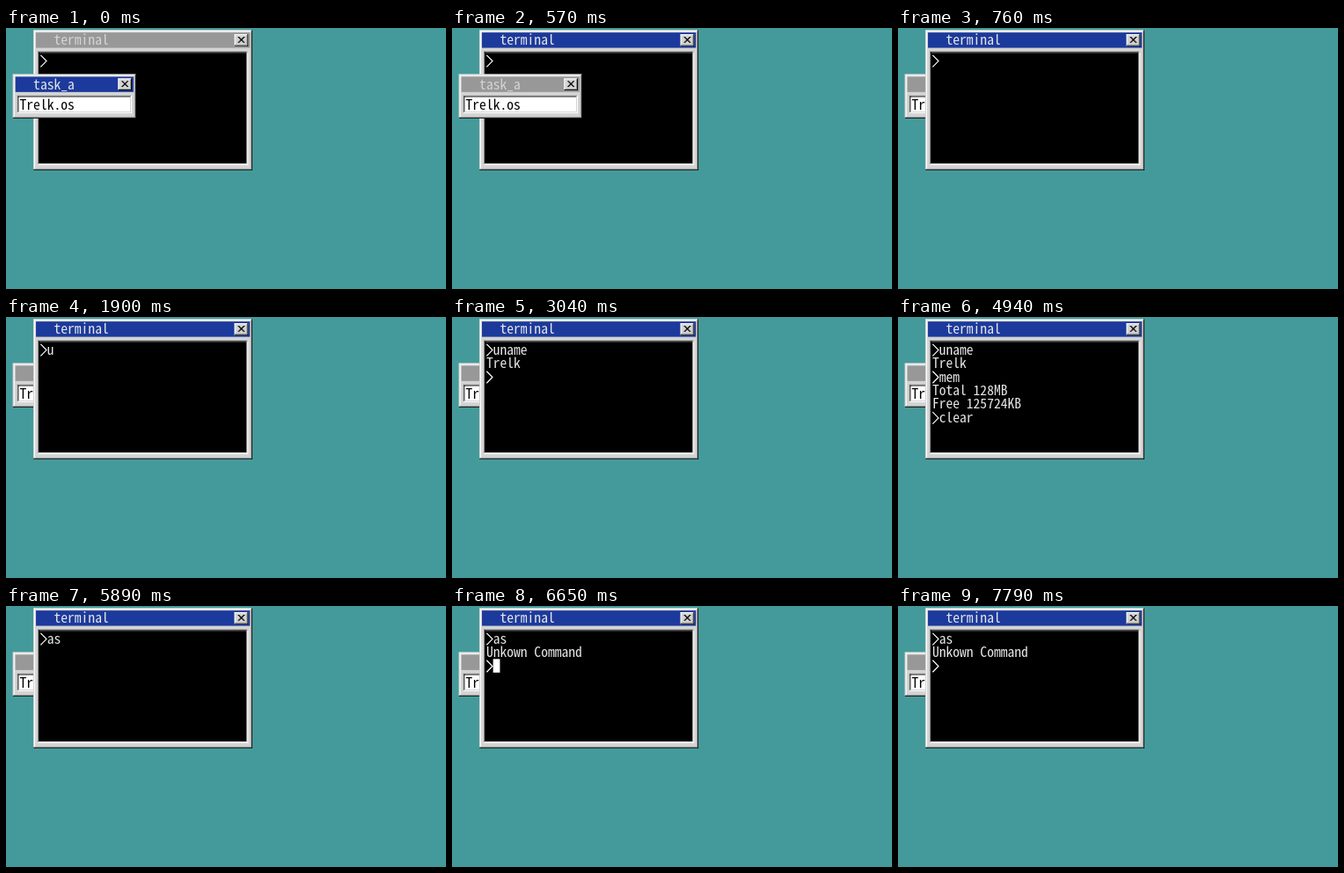
Write an HTML page with a canvas that moves like this. It is 500 px wide and 297 px high and loops after 8000 ms.

```html
<!DOCTYPE html>
<html lang="en">
<head>
<meta charset="utf-8">
<title>Desktop terminal</title>
<style>
  html, body { margin: 0; width: 100%; height: 100%; overflow: hidden; background: #449a9a; }
  canvas { display: block; }
</style>
</head>
<body>
<canvas id="stage" width="500" height="297"></canvas>
<script>
const ctx = document.getElementById('stage').getContext('2d');
const LOOP = 8000, SCALE_X = 0.9725, SCALE_Y = 0.967, TOP = -1.6;
const TEAL = '#449a9a', FACE = '#d4d4d4', SHADE = '#989898', BLUE = '#1c3a9c';
const WHITE = '#fff', BLACK = '#000', INK = '#e6e6e6';
const FAMILY = '"Noto Sans Mono CJK JP", "Noto Sans Mono", "Liberation Mono", monospace';

// Character cells are 8 x 16, so pick the size whose advance is 8.
ctx.font = '100px ' + FAMILY;
const FONT = '300 ' + 800 / ctx.measureText('0').width + 'px ' + FAMILY;

// Terminal contents over time: [start, text, cursor shown]
const uname = '>uname\nTrelk\n>';
const mem = uname + 'mem\nTotal 128MB\nFree 125724KB\n>';
const unknown = '>as\nUnkown Command\n>';
const steps = [
  [0, '>', false],
  [1520, '>', true],
  [1900, '>u', false],
  [2090, '>una', false],
  [2280, '>uname', false],
  [2470, uname, true],
  [2850, uname, false],
  [3420, uname, true],
  [3610, uname + 'me', true],
  [3800, uname + 'mem', false],
  [3990, mem, false],
  [4560, mem, true],
  [4750, mem + 'cle', true],
  [4940, mem + 'clear', false],
  [5130, '>', false],
  [5510, '>', true],
  [5890, '>as', false],
  [6270, unknown, true],
  [6840, unknown, false],
  [7410, unknown, true],
  [7790, unknown, false]
];

function rect(color, x, y, w, h) {
  ctx.fillStyle = color;
  ctx.fillRect(x, y, w, h);
}

// Four one-pixel edges: top and left in one colour, bottom and right in another.
function bevel(x, y, w, h, light, dark) {
  rect(light, x, y, w, 1);
  rect(light, x, y, 1, h);
  rect(dark, x, y + h - 1, w, 1);
  rect(dark, x + w - 1, y, 1, h);
}

function text(str, x, y, color) {
  ctx.fillStyle = color;
  ctx.fillText(str, x, y + 13.7);
}

function prompt(x, y) {
  ctx.strokeStyle = WHITE;
  ctx.beginPath();
  ctx.moveTo(x + 0.5, y + 1.5);
  ctx.lineTo(x + 7.3, y + 8.5);
  ctx.lineTo(x + 0.5, y + 15.5);
  ctx.stroke();
}

function closeButton(x, y) {
  rect(FACE, x, y, 16, 14);
  bevel(x, y, 16, 14, WHITE, BLACK);
  rect(SHADE, x + 1, y + 12, 14, 1);
  rect(SHADE, x + 14, y + 1, 1, 12);
  for (let i = -3; i <= 3; i++) {
    rect(BLACK, x + 7 - i, y + 6 + i, 2, 1);
    rect(BLACK, x + 7 + i, y + 6 + i, 2, 1);
  }
}

// Draws a window with one sunken text area; drawBody runs with the origin at that area.
function drawWindow(x, y, w, h, title, active, paper, drawBody) {
  ctx.save();
  ctx.translate(x, y);
  rect(FACE, 0, 0, w, h);
  bevel(0, 0, w, h, FACE, BLACK);
  bevel(1, 1, w - 2, h - 2, WHITE, SHADE);
  rect(active ? BLUE : SHADE, 3, 3, w - 6, 18);
  text(title, 24, 4, active ? INK : FACE);
  closeButton(w - 21, 5);

  const bottom = h - 37;
  bevel(5, 25, w - 10, bottom + 6, SHADE, WHITE);
  bevel(6, 26, w - 12, bottom + 4, BLACK, FACE);
  rect(paper, 7, 27, w - 14, bottom + 2);
  ctx.translate(8, 28);
  drawBody();
  ctx.restore();
}

function terminal(t, active) {
  const [, content, cursor] = steps.findLast(step => step[0] <= t);
  drawWindow(32, 4, 256, 165, 'terminal', active, BLACK, () => {
    const lines = content.split('\n');
    lines.forEach((line, row) => {
      const isPrompt = line[0] === '>';
      if (isPrompt) prompt(0, row * 16);
      text(isPrompt ? line.slice(1) : line, isPrompt ? 8 : 0, row * 16, INK);
    });
    const last = lines.length - 1;
    if (cursor) rect(WHITE, lines[last].length * 8, last * 16, 8, 16);
  });
}

function task(t, active) {
  drawWindow(8, 56, 144, 52, 'task_a', active, WHITE, () => {
    text('Trelk.os', 0, 0, BLACK);
    if (t >= 190 && t < 570) rect(BLACK, 64, 0, 8, 16);
  });
}

function draw(now) {
  const t = now % LOOP;
  const focused = t >= 570, raised = t >= 760;
  ctx.setTransform(1, 0, 0, 1, 0, 0);
  rect(TEAL, 0, 0, 500, 297);
  ctx.setTransform(SCALE_X, 0, 0, SCALE_Y, 0, TOP);
  ctx.font = FONT;
  ctx.lineWidth = 1.2;
  if (raised) task(t, !focused);
  terminal(t, focused);
  if (!raised) task(t, !focused);
  requestAnimationFrame(draw);
}
requestAnimationFrame(draw);
</script>
</body>
</html>
```
